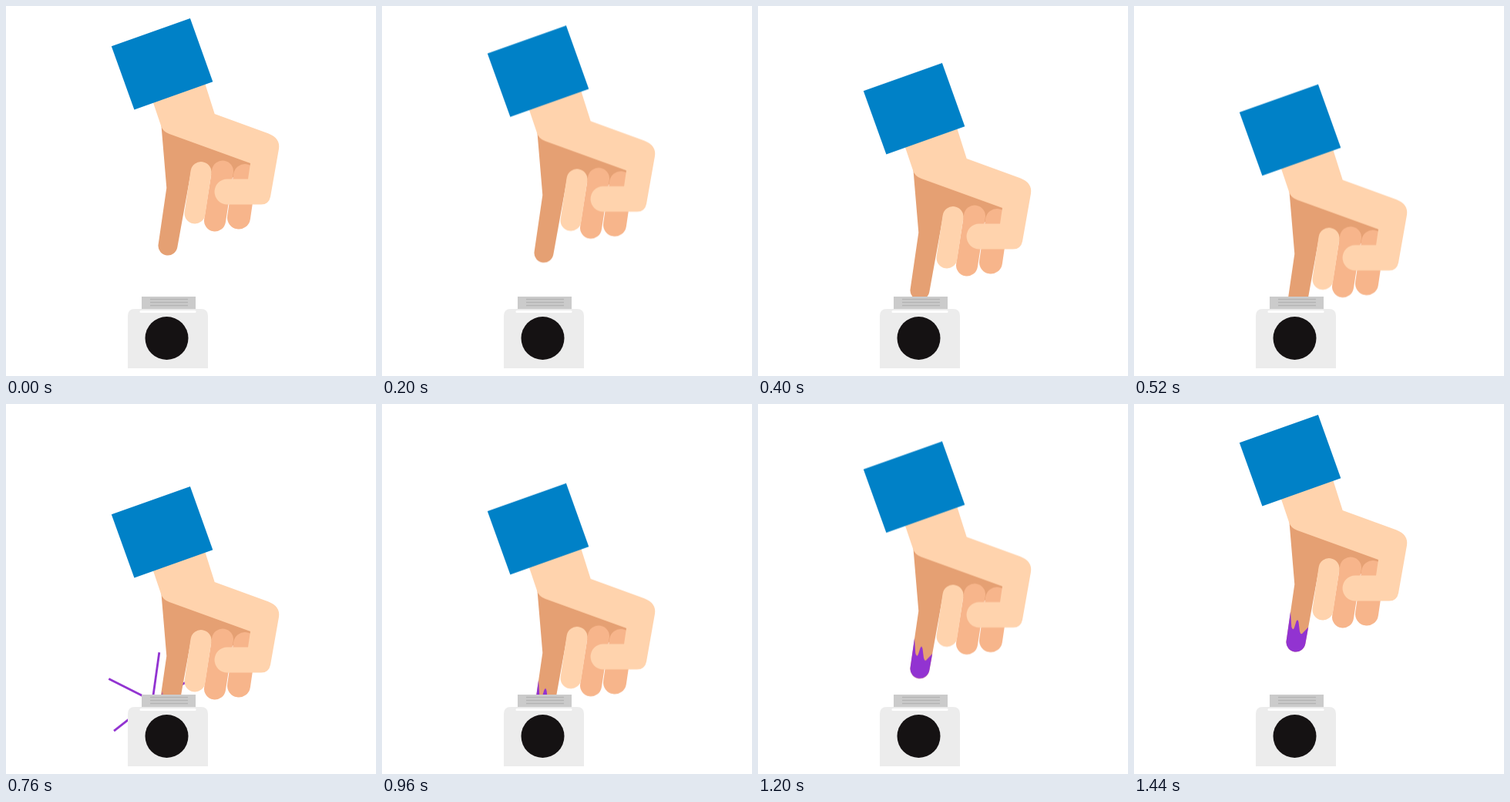
Recreate the animation shown at these times as an HTML page without scripts. Size 480 px wide and 480 px high, loop 2.4 s.

```html
<!DOCTYPE html>
<html lang="en">
<head>
<meta charset="utf-8">
<title>Dipping a finger in ink</title>
<style>
  html, body { margin: 0; height: 100%; overflow: hidden; background: #fff; }
  svg { display: block; width: 100vw; height: 100vh; }

  .hand, .ink, .burst { animation: 2.4s linear infinite; }
  .hand { animation-name: dip; }
  .ink { animation-name: soak; fill: #9233d1; }
  .burst { animation-name: burst; stroke: #9233d1; stroke-width: 2.8; fill: none; }

  .light { fill: #ffd3ad; }
  .shade { fill: #e5a073; }
  .finger { fill: none; stroke: #f7b58b; stroke-linecap: round; }
  .front { stroke: #ffd3ad; }

  @keyframes dip {
    0% { transform: translateY(0); }
    1.667% { transform: translateY(0); animation-timing-function: cubic-bezier(.57, 0, .6, 1); }
    25.417% { transform: translateY(91px); }
    36.5% { transform: translateY(91px); animation-timing-function: ease-in-out; }
    60%, 100% { transform: translateY(-2px); }
  }
  @keyframes soak {
    0%, 30.8% { opacity: 0; transform: translateY(12px); }
    30.81% { opacity: 1; transform: translateY(12px); }
    35.8%, 100% { opacity: 1; transform: none; }
  }
  @keyframes burst {
    0%, 25.8% { stroke-dasharray: 0 200; stroke-dashoffset: 0; }
    31.667% { stroke-dasharray: 63 200; stroke-dashoffset: 0; }
    35% { stroke-dasharray: 45 200; stroke-dashoffset: -50; }
    38.333%, 100% { stroke-dasharray: 0 200; stroke-dashoffset: -95; }
  }
</style>
</head>
<body>
<svg viewBox="0 0 480 480">
  <defs><path id="ray" d="M0 0H95"/></defs>

  <g class="burst" transform="translate(190 385)">
    <use href="#ray" transform="rotate(30)"/>
    <use href="#ray" transform="rotate(86)"/>
    <use href="#ray" transform="rotate(142)"/>
    <use href="#ray" transform="rotate(206.6)"/>
    <use href="#ray" transform="rotate(278)"/>
    <use href="#ray" transform="rotate(331)"/>
  </g>

  <g class="hand">
    <path class="shade" d="M201.3 153L318 203L314 225L240 215L222.3 313A12.5 12.5 0 0 1 197.5 310L208.3 236Z"/>
    <path class="ink" d="M203 271.5L204.3 291Q206 297 208 292L210.5 284Q212.5 280 213.5 285L215 297Q216.5 302.5 219 299L226.2 291.5L222.3 313A12.5 12.5 0 0 1 197.5 310Z"/>
    <path class="finger" stroke-width="28" d="M281 214.5L271 278.5"/>
    <path class="finger" stroke-width="30" d="M310 220L302 274.5"/>
    <path class="light" d="M190.5 124L258 100L270.7 140L340 165.3Q356 171.3 354 185.3L343 247.5Q341 257.5 331 257.5H287A16.5 16.5 0 0 1 287 224.5H314L317 204L212 166Q203.5 163 201.3 156Z"/>
    <path class="finger front" stroke-width="27" d="M253 215.5L245 269"/>
    <path fill="#0081c7" d="M238.9 16L268.3 98.2L166.4 134.4L136.8 52.2Z"/>
  </g>

  <g class="bottle">
    <path fill="#cbcbcb" d="M176 377H246V394H176Z"/>
    <path stroke="#b4b4b4" stroke-width="1.4" d="M187 380.5H236M187 384.5H236M187 388.5H236"/>
    <path fill="#ececec" d="M158 470V402Q158 393 167 393H253Q262 393 262 402V470Z"/>
    <path stroke="#fff" stroke-width="3" stroke-linecap="round" d="M175 396.5H245"/>
    <circle cx="208.5" cy="431" r="28" fill="#151213"/>
  </g>
</svg>
</body>
</html>
```
